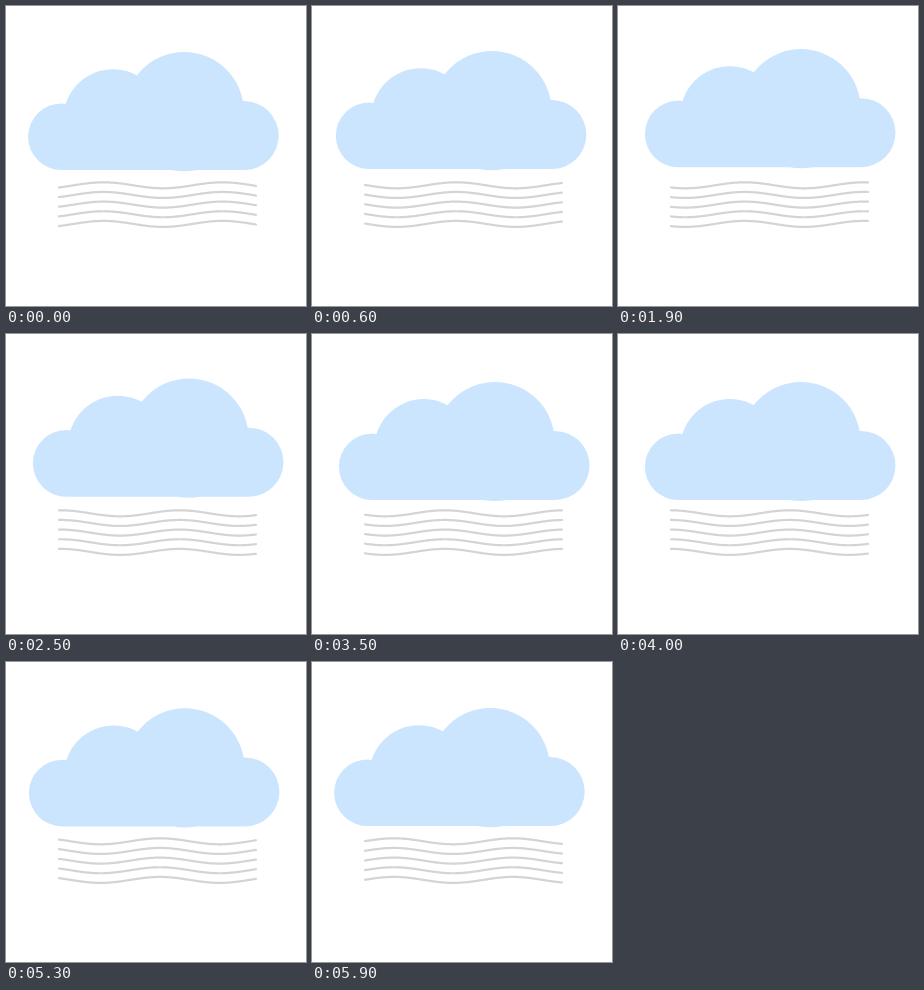
An HTML page with a canvas for the animation above (6 s loop, 300 by 300 pixels).

```html
<!DOCTYPE html>
<html lang="en">
<head>
<meta charset="utf-8">
<title>Drifting cloud</title>
<style>
  html, body { margin: 0; width: 100%; height: 100%; overflow: hidden; background: #fff; }
  canvas { display: block; width: 300px; height: 300px; }
</style>
</head>
<body>
<canvas id="stage" width="300" height="300"></canvas>
<script>
const ctx = document.getElementById('stage').getContext('2d');
const LOOP = 6000, STEP = 100;
const WAVELENGTH = 119, AMPLITUDE = 3;
const WAVE_SPEED = 4 * WAVELENGTH / 61; // pixels per step
const PUFFS = [[55.4, 130.8, 33.3], [107, 112.8, 49.6], [178.2, 105.6, 59.6], [238.2, 129.6, 34.5]];

// Smooth progress from 0 to 1 between two times
function ease(t, start, end) {
  const p = Math.min(1, Math.max(0, (t - start) / (end - start)));
  return p * p * (3 - 2 * p);
}

function drawCloud(t) {
  const away = ease(t, 0, 1500);
  const down = ease(t, 1950, 3450);
  const home = ease(t, 3950, 5750);
  ctx.save();
  ctx.translate(4.8 * (away - home), -2.9 * away + 4.8 * down - 1.9 * home);
  ctx.fillStyle = '#cbe5ff';
  ctx.beginPath();
  for (const [x, y, r] of PUFFS) {
    ctx.moveTo(x + r, y);
    ctx.arc(x, y, r, 0, Math.PI * 2);
  }
  ctx.rect(55.4, 126, 182.8, 38.1);
  ctx.fill();
  ctx.restore();
}

function drawWind(t) {
  const crest = 97.5 + WAVE_SPEED * t / STEP;
  ctx.strokeStyle = '#d4d4d4';
  ctx.lineWidth = 2.2;
  ctx.lineCap = 'round';
  for (let row = 0; row < 5; row++) {
    ctx.beginPath();
    for (let x = 53; x <= 250; x++) {
      const phase = (x - crest) / WAVELENGTH * Math.PI * 2;
      ctx.lineTo(x, 179.3 + row * 9.65 - AMPLITUDE * Math.cos(phase));
    }
    ctx.stroke();
  }
}

function frame() {
  const now = performance.now() % LOOP;
  const t = Math.floor(now / STEP) * STEP;
  ctx.fillStyle = '#fff';
  ctx.fillRect(0, 0, 300, 300);
  drawCloud(t);
  drawWind(t);
  requestAnimationFrame(frame);
}
frame();
</script>
</body>
</html>
```
